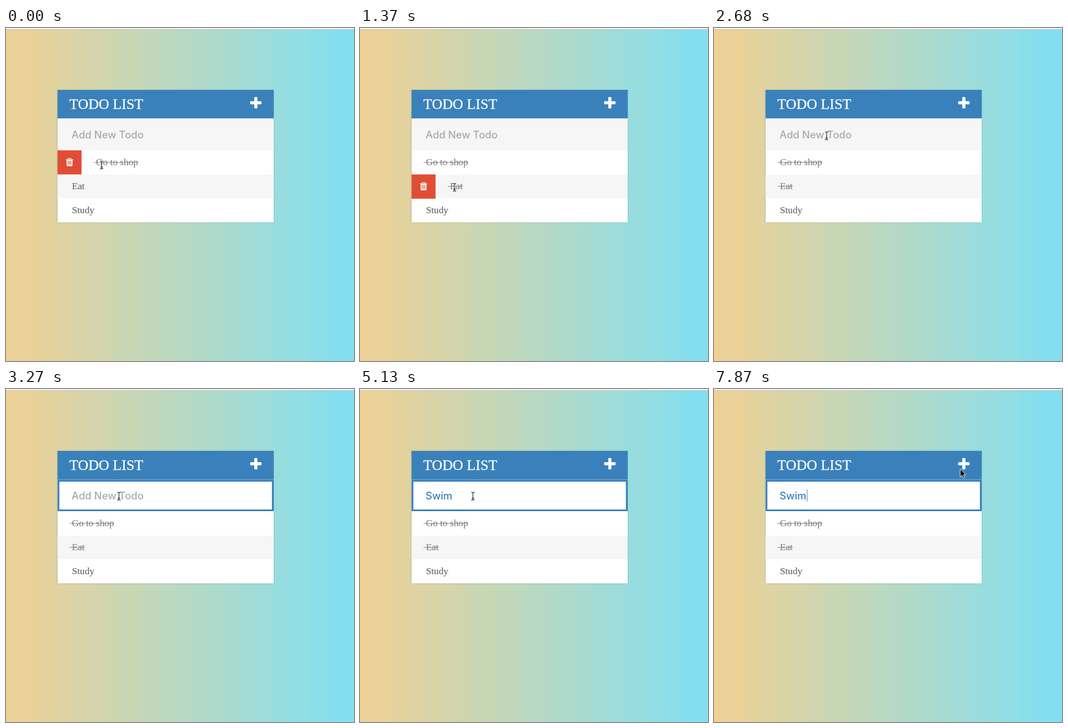
Animation, 624 px wide and 597 px high, one loop 7990 ms. Source, as an HTML page:

```html
<!DOCTYPE html>
<html lang="en">
<head>
<meta charset="utf-8">
<title>Todo list</title>
<style>
@property --w { syntax: '<number>'; inherits: true; initial-value: 0; }

html, body { margin: 0; width: 100%; height: 100%; overflow: hidden; }
svg { display: block; width: 624px; height: 597px; }
text { font-family: 'Liberation Serif', 'Times New Roman', serif; white-space: pre; }
.title { font-size: 25.9px; fill: #fff; stroke: #fff; stroke-width: .3px; }
.field { font: 500 18.4px Inter, Roboto, sans-serif; }
.item { font-size: 17.24px; fill: #666; stroke: #666; stroke-width: .15px; }
.done { fill: #808080; stroke: #808080; }

/* --w is how far a row's delete button is open, 0 to 1 */
.row1 { animation: row1 7.99s linear infinite; }
.row2 { animation: row2 7.99s linear infinite; }
.bin { opacity: var(--w); }
.bin rect { transform: scaleX(var(--w)); }
.icon { transform: translateX(calc(var(--w) * 21.55px)); }
.label { transform: translateX(calc(var(--w) * 43.1px)); }

.step { animation: 7.99s step-end infinite; }
.check { animation-name: check; }
.gray { animation-name: gray; }
.focus { animation-name: focus; }
.hint { animation-name: hint; }
.k1 { animation-name: k1; }
.k2 { animation-name: k2; }
.k3 { animation-name: k3; }
.k4 { animation-name: k4; }
.caret { animation-name: caret; }
.arrow { animation-name: arrow; }
.beam { animation-name: beam; }
.cursor { animation: move 7.99s linear infinite; }

@keyframes row1 {
  0%, 3.73% { --w: 1; }
  6.233%, 30.188% { --w: 0; }
  31.289% { --w: .44; }
  32.39%, 100% { --w: 0; }
}
@keyframes row2 {
  0%, 3.73% { --w: 0; }
  6.233%, 30.288% { --w: 1; }
  32.791%, 100% { --w: 0; }
}
@keyframes check {
  0% { visibility: hidden; }
  17.146%, 100% { visibility: visible; }
}
@keyframes gray {
  0% { fill: #666; stroke: #666; }
  17.146%, 100% { fill: #808080; stroke: #808080; }
}
@keyframes focus {
  0% { visibility: hidden; }
  34.668%, 100% { visibility: visible; }
}
@keyframes hint {
  0% { visibility: visible; }
  45.432%, 100% { visibility: hidden; }
}
@keyframes k1 { 0% { visibility: hidden; } 45.432%, 100% { visibility: visible; } }
@keyframes k2 { 0% { visibility: hidden; } 48.436%, 100% { visibility: visible; } }
@keyframes k3 { 0% { visibility: hidden; } 52.941%, 100% { visibility: visible; } }
@keyframes k4 { 0% { visibility: hidden; } 58.198%, 100% { visibility: visible; } }
@keyframes caret {
  0% { visibility: hidden; transform: translateX(0); }
  34.668% { visibility: visible; transform: translateX(0); }
  40.926% { visibility: hidden; transform: translateX(0); }
  45.432% { visibility: visible; transform: translateX(12px); }
  48.436% { visibility: visible; transform: translateX(27px); }
  52.941% { visibility: visible; transform: translateX(32px); }
  58.198% { visibility: visible; transform: translateX(49px); }
  64.205% { visibility: hidden; transform: translateX(49px); }
  70.964% { visibility: visible; transform: translateX(49px); }
  76.971% { visibility: hidden; transform: translateX(49px); }
  82.979% { visibility: visible; transform: translateX(49px); }
  89.612% { visibility: hidden; transform: translateX(49px); }
  95.62%, 100% { visibility: visible; transform: translateX(49px); }
}
@keyframes move {
  0% { transform: translate(171.5px, 245.5px); animation-timing-function: step-end; }
  .626% { transform: translate(177.5px, 245.5px); }
  2.503% { transform: translate(177.5px, 246px); }
  3.73% { transform: translate(181px, 264px); }
  6.133% { transform: translate(185.5px, 291px); }
  9.011%, 11.264% { transform: translate(187.5px, 292px); }
  13.392%, 19.399% { transform: translate(169.5px, 285.5px); }
  20.15%, 29.912% { transform: translate(172.5px, 286.5px); }
  30.288% { transform: translate(176.5px, 262px); }
  31.289% { transform: translate(196.5px, 202.5px); }
  32.791% { transform: translate(201.5px, 194px); }
  34.668%, 89.612% { transform: translate(202.5px, 192px); animation-timing-function: ease-in-out; }
  98.498%, 100% { transform: translate(441.5px, 143.5px); }
}
@keyframes arrow {
  0% { visibility: hidden; }
  2.9% { visibility: visible; }
  11.89% { visibility: hidden; }
  30.15% { visibility: visible; }
  31% { visibility: hidden; }
  94.68%, 100% { visibility: visible; }
}
@keyframes beam {
  0% { visibility: visible; }
  2.9% { visibility: hidden; }
  11.89% { visibility: visible; }
  30.15% { visibility: hidden; }
  31% { visibility: visible; }
  94.68%, 100% { visibility: hidden; }
}
</style>
</head>
<body>
<svg viewBox="0 0 624 597">
  <defs>
    <filter id="soft" x="-5%" y="-5%" width="110%" height="110%"><feGaussianBlur stdDeviation="1.2"/></filter>
    <g id="trash">
      <path d="M-3.1 -4.6L-2.3 -6.7H2.3L3.1 -4.6" fill="none" stroke="#fff" stroke-width="1.2"/>
      <rect x="-6.7" y="-5" width="13.4" height="1.3" rx=".4" fill="#fff"/>
      <path d="M-5.2 -4H5.2V5.6Q5.2 7.2 3.8 7.2H-3.8Q-5.2 7.2 -5.2 5.6Z" fill="#fff"/>
      <path d="M-2.5 -2.4V4.9M0 -2.4V4.9M2.5 -2.4V4.9" stroke="#e14d34" stroke-width="1.2"/>
    </g>
    <path id="ibeam" d="M-3 -7Q0 -7 0 -5V5Q0 7 -3 7M3 -7Q0 -7 0 -5M3 7Q0 7 0 5M-2 3.5H2" fill="none"/>
  </defs>

  <g id="bands"></g>
  <rect width="624" height="2" fill="#f5f5f5"/>
  <rect y="2" width="624" height="1" fill="#c6c6c0"/>

  <rect x="92" y="111" width="388" height="237.5" opacity=".22" filter="url(#soft)"/>
  <rect x="92.5" y="111" width="387.5" height="51.5" fill="#3a81bb"/>
  <text class="title" x="113.6" y="145">TODO LIST</text>
  <g fill="#fff">
    <rect x="437.8" y="131.2" width="20.4" height="5.6" rx="1.4"/>
    <rect x="445.2" y="123.8" width="5.6" height="20.4" rx="1.4"/>
  </g>

  <rect x="92.5" y="162" width="387.5" height="57.5" fill="#f6f6f6"/>
  <g class="step focus">
    <rect x="92.5" y="162" width="387.5" height="1" fill="#79a9d0"/>
    <rect x="94.1" y="164.6" width="384.3" height="53" fill="#fff" stroke="#3a81bb" stroke-width="3.2"/>
  </g>
  <text class="field step hint" x="117.5" y="198" fill="#a9a9a9">Add New Todo</text>
  <text class="field" x="117.5" y="198" fill="#3a81bb"><tspan class="step k1">S</tspan><tspan class="step k2">w</tspan><tspan class="step k3">i</tspan><tspan class="step k4">m</tspan></text>
  <rect class="step caret" x="117.5" y="180" width="1" height="22" fill="#3a81bb"/>

  <rect x="92.5" y="219" width="387.5" height="129.5" fill="#fff"/>
  <rect x="92.5" y="263" width="387.5" height="42" fill="#f6f6f6"/>

  <g class="row1">
    <g class="bin" transform="translate(92.4 219.3)">
      <rect width="43.1" height="43.2" fill="#e14d34"/>
      <g class="icon"><use href="#trash" y="21.2"/></g>
    </g>
    <g class="label">
      <text class="item done" x="118.2" y="246">Go to shop</text>
      <rect x="114" y="240.5" width="80" height="1" fill="#808080"/>
    </g>
  </g>

  <g class="row2">
    <g class="bin" transform="translate(92.4 262.5)">
      <rect width="43.1" height="43.5" fill="#e14d34"/>
      <g class="icon"><use href="#trash" y="21.2"/></g>
    </g>
    <g class="label">
      <text class="item step gray" x="118.2" y="289">Eat</text>
      <rect class="step check" x="114" y="283.5" width="27.5" height="1" fill="#808080"/>
    </g>
  </g>

  <text class="item" x="118.2" y="332">Study</text>

  <g class="cursor">
    <g class="step beam">
      <use href="#ibeam" stroke="#fff" stroke-width="2.4" stroke-opacity=".6"/>
      <use href="#ibeam" stroke="#111" stroke-width="1.1"/>
    </g>
    <path class="step arrow" d="M0 0V14.2L3.3 11.2L5.5 16.3L7.9 15.3L5.7 10.3H10.2Z"
      fill="#000" stroke="#fff" stroke-width="1" stroke-linejoin="round"/>
  </g>
</svg>
<script>
// Banded horizontal gradient: each band takes the blend at its middle.
const edges = [0, 8, 56, 84, 112, 140, 168, 196, 238, 252, 280, 308, 336, 364, 392, 420, 448, 476, 510, 545, 580, 624];
const from = [241, 208, 146], to = [127, 224, 243];
const bands = document.getElementById('bands');
edges.slice(1).forEach((end, i) => {
  const start = edges[i];
  const p = (start + end) / 2 / 624;
  const mix = from.map((c, n) => Math.round(c + (to[n] - c) * p));
  const band = document.createElementNS('http://www.w3.org/2000/svg', 'rect');
  band.setAttribute('x', start);
  band.setAttribute('width', end - start);
  band.setAttribute('height', 597);
  band.setAttribute('fill', `rgb(${mix})`);
  bands.append(band);
});
</script>
</body>
</html>
```
